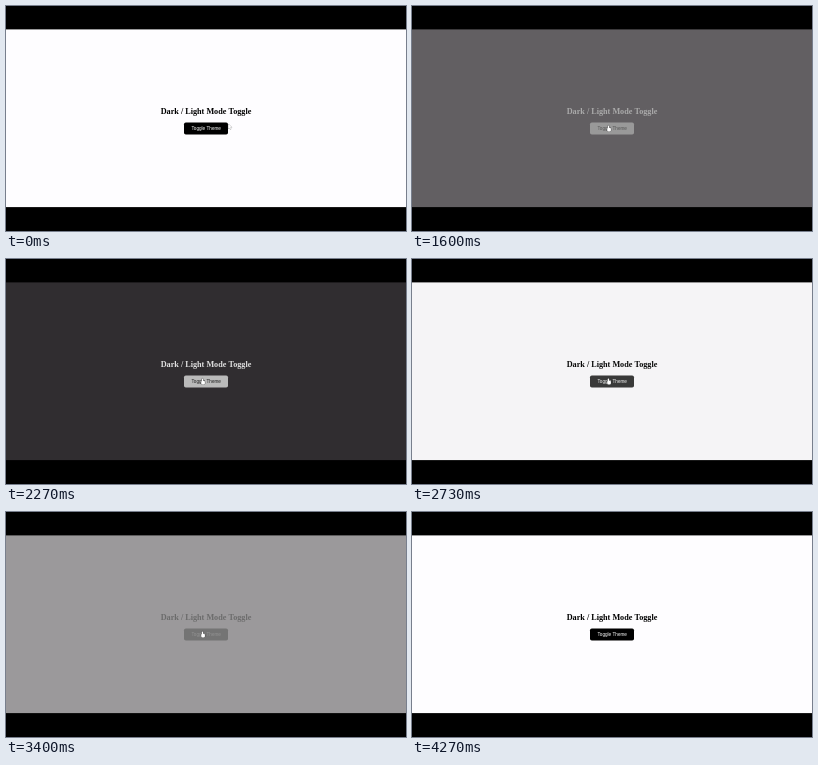
Animation, 400 px wide and 225 px high, one loop 4340 ms. Source, as an HTML page with a canvas:

```html
<!DOCTYPE html>
<html lang="en">
<head>
<meta charset="utf-8">
<title>Dark / Light Mode Toggle</title>
<style>
  html, body { margin: 0; width: 100%; height: 100%; overflow: hidden; background: #000; }
  canvas { display: block; width: 100vw; height: 100vh; }
</style>
</head>
<body>
<canvas id="stage"></canvas>
<script>
const W = 400, H = 225, LOOP = 4340, FPS = 15, FADE = 300;
const canvas = document.getElementById('stage');
const ctx = canvas.getContext('2d');

// Moments at which each state flips; both start off
const CLICKS = [1483, 2232, 2717, 3300];
const CROSSINGS = [5, 433, 875, 3935];

const BUTTON = { x: 178, y: 116.4, w: 44, h: 12.1, r: 1.8 };
const LIGHT = [254, 253, 255], DARK = [20, 17, 20];

// Pointer stations: start, left turn, resting place, way out
const START = [222.4, 118], LEFT = [167.8, 119], REST = [196.4, 119.3], OUT = [271, 24];

const mix = (a, b, p) => a + (b - a) * p;
const mixAll = (a, b, p) => a.map((v, i) => mix(v, b[i], p));
const rgb = c => `rgb(${c.map(Math.round).join(',')})`;
const gray = v => rgb([v, v, v]);
const progress = (t, from, to) => Math.min(1, Math.max(0, (t - from) / (to - from)));

// CSS "ease": cubic-bezier(.25, .1, .25, 1)
function ease(x) {
  const bez = (a, b, u) => 3 * a * u * (1 - u) ** 2 + 3 * b * u * u * (1 - u) + u ** 3;
  let lo = 0, hi = 1;
  for (let i = 0; i < 24; i++) {
    const mid = (lo + hi) / 2;
    if (bez(.25, .25, mid) < x) lo = mid; else hi = mid;
  }
  return bez(.1, 1, lo);
}

const stateAt = (flips, t) => flips.reduce(
  (v, at, i) => mix(v, 1 - i % 2, ease(progress(t, at, at + FADE))), 0);

function pointerAt(t) {
  if (t < 533) return mixAll(START, LEFT, t / 533);
  if (t < 3933) {
    const p = progress(t, 533, 1200);
    const [x, y] = mixAll(LEFT, REST, p ** 1.55);
    return [x, y + 8 * Math.sin(Math.PI * p)];
  }
  return mixAll(REST, OUT, progress(t, 3933, 4067) ** 1.4);
}

function text(str, font, x, y, color) {
  ctx.font = font;
  ctx.fillStyle = color;
  ctx.fillText(str, x, y);
}

const arrow = new Path2D('M0 0V4.6L1.1 3.7 1.9 5.4 2.6 5.1 1.8 3.4 3.2 3.3Z');
const hand = new Path2D();
hand.roundRect(-.6, .1, 1.3, 5, .6);
hand.roundRect(-1.2, 2.5, 3.7, 3.7, 1.2);

function drawPointer(t) {
  if (t > 4100) return;
  const [x, y] = pointerAt(t), b = BUTTON;
  const over = x > b.x && x < b.x + b.w && y > b.y && y < b.y + b.h;
  const shape = over ? hand : arrow;
  ctx.save();
  ctx.translate(x, y);
  ctx.lineWidth = .6;
  ctx.strokeStyle = over ? '#333' : '#777';
  ctx.stroke(shape);
  ctx.fillStyle = '#fff';
  ctx.fill(shape);
  ctx.restore();
}

function draw(t) {
  const dark = stateAt(CLICKS, t), hover = stateAt(CROSSINGS, t);

  ctx.fillStyle = '#000';
  ctx.fillRect(0, 0, W, H);
  ctx.fillStyle = rgb(mixAll(LIGHT, DARK, dark));
  ctx.fillRect(0, 23.4, W, 177.7);

  ctx.textAlign = 'center';
  text('Dark / Light Mode Toggle', 'bold 8.2px "Liberation Serif", "Times New Roman", serif',
    200, 108.1, gray(255 * dark));

  const b = BUTTON;
  ctx.fillStyle = gray(mix(51 * hover, 255 - 51 * hover, dark));
  ctx.beginPath();
  ctx.roundRect(b.x, b.y, b.w, b.h, b.r);
  ctx.fill();
  text('Toggle Theme', '4.65px "Liberation Sans", Arial, sans-serif',
    200.2, 124.2, gray(255 * (1 - dark)));

  drawPointer(t);
}

function resize() {
  const dpr = window.devicePixelRatio || 1;
  const w = Math.round(innerWidth * dpr), h = Math.round(innerHeight * dpr);
  if (canvas.width !== w || canvas.height !== h) {
    canvas.width = w;
    canvas.height = h;
  }
  ctx.setTransform(w / W, 0, 0, h / H, 0, 0);
}

// Motion advances in whole steps of 1/15 s
const snap = t => Math.min(64, Math.floor((t + 3.5) * FPS / 1000)) * 1000 / FPS;

const begin = performance.now();
function tick() {
  resize();
  draw(snap((performance.now() - begin) % LOOP));
  requestAnimationFrame(tick);
}
tick();
</script>
</body>
</html>
```
